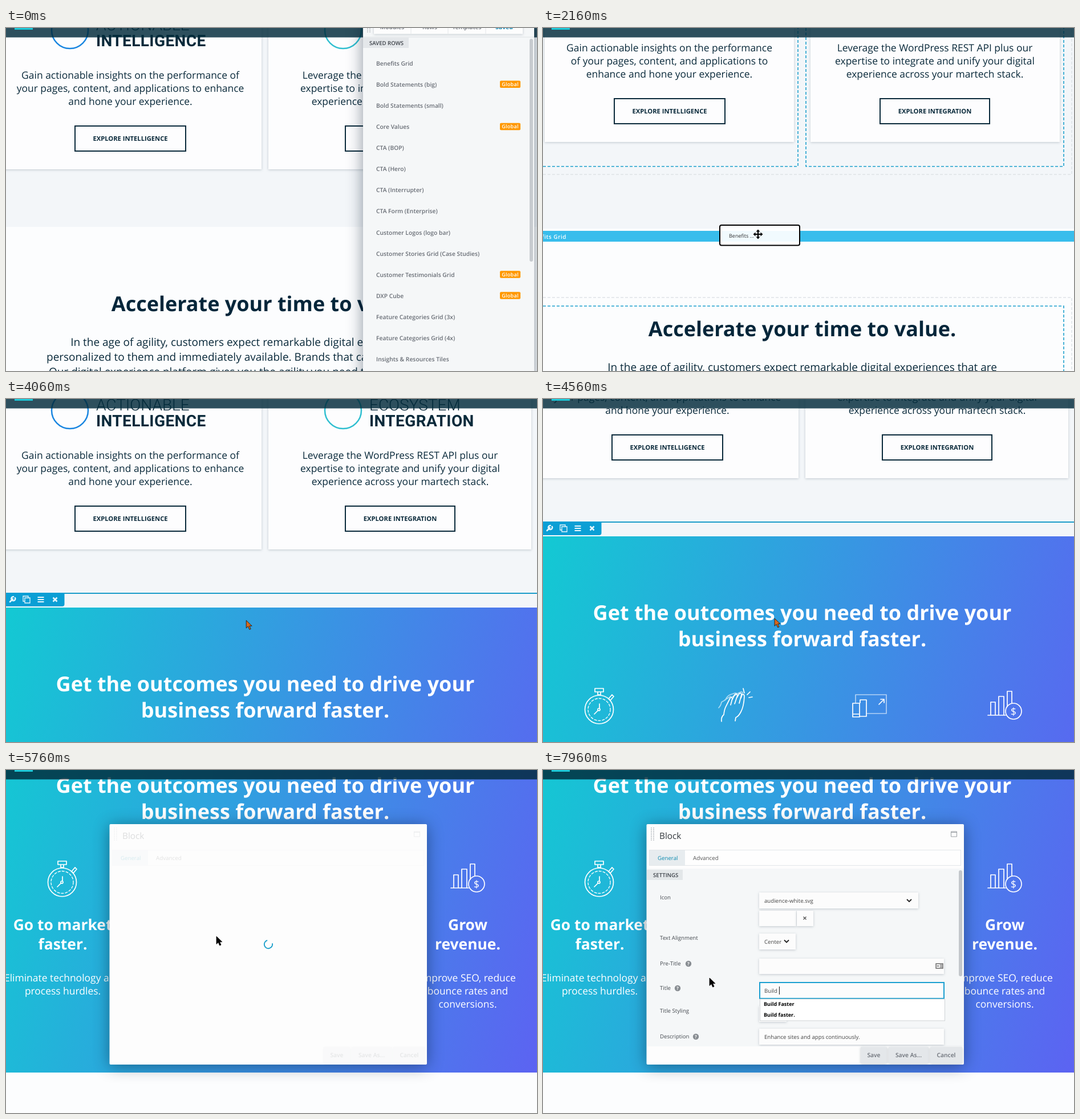
An HTML page that plays this animation: 931 px wide and 602 px high, repeating every 8000 ms.

```html
<!DOCTYPE html>
<html lang="en">
<head>
<meta charset="utf-8">
<title>Page builder</title>
<style>
html, body { margin: 0; width: 931px; height: 602px; overflow: hidden; }
svg { display: block; font-family: "Open Sans", sans-serif; text-rendering: geometricPrecision; }
.shadow { filter: drop-shadow(0 1px 2px rgba(40, 60, 80, .25)); }
.deep { filter: drop-shadow(0 3px 14px rgba(0, 20, 40, .45)); }
.line { fill: none; stroke: #fff; stroke-width: 1.7; stroke-linejoin: round; stroke-linecap: round; }
</style>
</head>
<body>
<svg id="stage" width="931" height="602" viewBox="0 0 931 602"></svg>
<script>
const NAVY = '#0a2a3b', BLUE = '#0b9fd5', GREY = '#686d75';

// Markup helpers
const rect = (x, y, w, h, fill, more = '') =>
  `<rect x="${x}" y="${y}" width="${w}" height="${h}" fill="${fill}" ${more}/>`;
const path = (d, more = '') => `<path d="${d}" ${more}/>`;
const text = (x, y, s, size, fill, weight = 400, anchor = 'start', more = '') =>
  `<text x="${x}" y="${y}" font-size="${size}" fill="${fill}" font-weight="${weight}" text-anchor="${anchor}" ${more}>${s}</text>`;
const lines = (x, y, step, list, size, fill, weight, anchor = 'middle') =>
  list.map((s, i) => text(x, y + i * step, s, size, fill, weight, anchor)).join('');
const group = (id, body, more = '') => `<g id="${id}" ${more}>${body}</g>`;
const at = (x, y, body) => `<g transform="translate(${x} ${y})">${body}</g>`;
const white = 'class="line"';

const icons = {
  wrench: path('M-4 4L1-1M5-3A3.500 3.500 0 1 1 2-5', 'fill="none" stroke="#e8f6fc" stroke-width="2.500" stroke-linecap="round"'),
  copy: path('M-3-3H6V6H-3ZM-3 3H-6V-6H3V-3', 'fill="none" stroke="#e8f6fc" stroke-width="1.300"'),
  menu: path('M-5.500-4H5.500M-5.500 0H5.500M-5.500 4H5.500', 'stroke="#e8f6fc" stroke-width="2"'),
  close: path('M-3.500-3.500L3.500 3.500M-3.500 3.500L3.500-3.500', 'stroke="#e8f6fc" stroke-width="2.600"'),
  columns: path('M-6-5H6V5H-6ZM0-5V5M-6-4H6', 'fill="none" stroke="#e8f6fc" stroke-width="1.400"'),
  move: path('M-6 0H6M0-6V6', 'stroke="currentColor" stroke-width="2.200"') +
    path('M0-8.500l3.500 4h-7zM0 8.500l3.500-4h-7zM-8.500 0l4-3.500v7zM8.500 0l-4-3.500v7z', 'fill="currentColor"')
};
const toolbar = (x, y, w, names) =>
  path(`M${x} ${y}h${w}v20q0 4-4 4h${4 - w}z`, `fill="${BLUE}"`) +
  names.map((n, i) => at(x + 11 + i * 25, y + 12, icons[n])).join('');
const rowBar = y => rect(0, y, 931, 2, '#1a9cc9') + toolbar(0, y, 102.5, ['wrench', 'copy', 'menu', 'close']);
const spinner = (id, x, y) => at(x, y, group(id,
  path('M5.100-5.100A7.200 7.200 0 1 1-5.100-5.100', 'fill="none" stroke="#1b9fcb" stroke-width="1.900"')));
const chevron = (x, y) => path(`M${x - 4} ${y - 2}l4 4 4-4`, 'fill="none" stroke="#222" stroke-width="1.800"');
const grip = (x, y, rows) => path(`M${x} ${y}v${rows * 3}M${x + 4} ${y}v${rows * 3}`,
  'stroke="#b9bec3" stroke-width="2" stroke-dasharray="1.500 1.500"');

const button = (x, y, w, s) => rect(x + 1, y + 1, w - 2, 44, '#fdfdfe', `stroke="${NAVY}" stroke-width="2"`) +
  text(x + w / 2, y + 27, s, 11.2, NAVY, 700, 'middle');
const card = (x, bottom, w) => rect(x, -60, w, bottom + 60, '#fdfdfe', 'class="shadow"');
const integrationCopy = ['Leverage the WordPress REST API plus our',
  'expertise to integrate and unify your digital', 'experience across your martech stack.'];
const lockup = (x, color, top, bottom) =>
  `<circle cx="${x}" cy="4" r="32" fill="none" stroke="${color}" stroke-width="2.500"/>` +
  text(x + 46, 4, top, 28, NAVY, 300, 'start', 'font-family="Roboto, sans-serif"') +
  text(x + 46, 32, bottom, 28, NAVY, 700, 'start', 'font-family="Roboto, sans-serif" letter-spacing=".4"');
const accelerate = y => text(454.5, y, 'Accelerate your time to value.', 36, '#04263a', 700, 'middle') +
  text(454.5, y + 61, 'In the age of agility, customers expect remarkable digital experiences that are', 19, NAVY, 400, 'middle') +
  text(71, y + 87, 'personalized to them and immediately available. Brands that can', 19, NAVY) +
  text(75, y + 113, 'Our digital experience platform gives you the agility you need to', 19, NAVY);

const cards = rect(0, -700, 931, 1049, '#f3f6f9') + card(-10, 248, 458) + card(460, 248, 461) +
  lockup(112, '#1a86e0', 'ACTIONABLE', 'INTELLIGENCE') + lockup(591, '#30bfd0', 'ECOSYSTEM', 'INTEGRATION') +
  lines(218, 89, 23, ['Gain actionable insights on the performance of',
    'your pages, content, and applications to enhance', 'and hone your experience.'], 17.45, NAVY) +
  lines(691, 89, 23, integrationCopy, 17.45, NAVY) +
  button(120, 171, 196, 'EXPLORE INTELLIGENCE') + button(594, 171, 194, 'EXPLORE INTEGRATION');

const dashed = (d, color) => path(d, `fill="none" stroke="${color}" stroke-width="1.600" stroke-dasharray="5 3"`);
const dragLayout = rect(0, 0, 931, 352, '#f3f6f9') + card(3, 200, 437) + card(469, 200, 437) +
  lines(221.5, 41, 23, ['Gain actionable insights on the performance',
    'of your pages, content, and applications to', 'enhance and hone your experience.'], 17.45, NAVY) +
  lines(687, 41, 23, integrationCopy, 17.45, NAVY) +
  button(124, 123, 196, 'EXPLORE INTELLIGENCE') + button(590, 123, 194, 'EXPLORE INTEGRATION') +
  dashed('M0 257H927V0M0 473H927V602', '#dfe4e8') +
  dashed('M0 243H447V0M461 0V243H913V0M0 488H913V602', '#1fa1cd') + accelerate(541) +
  group('dropBar', rect(0, 356, 931, 19, '#38bdec') + text(41, 370, 'Benefits Grid', 10, '#fff', 600, 'end', 'letter-spacing=".5"'));

// Gradient row, with its top edge at y = 0
const feature = (x, title, copy) => lines(x, 387.5, 34, title, 26.4, '#fff', 700) + lines(x, 478, 23, copy, 17.45, '#fff');
const stopwatch = `<circle cx="98.500" cy="304" r="25"/><circle cx="98.500" cy="304" r="19.500" stroke-dasharray="4 3" stroke-width="1.300"/>
  <circle cx="98" cy="304" r="2"/>` + path('M91 267h15v6h-15zM96 273v5h5v-5M115 285l6-7 3 3-6 7zM99 294v8M96 306l-6 6');
const clap = path('M313 325q-1-8 4-12q1-10 4-15l7-14q3-3 4 1l-3 11m2-8l5-10q4-3 5 1l-5 15m4-11l4-7q4-2 4 2l-4 15m3-9l2-6q4-2 4 3q-1 18-6 27q-4 8-9 10l-1 6M351 267l2 8M358 278l5-5M361 283l6-1') +
  path('M308 301q4-4 5-10l7-4q2-6 8-9l9-3q4 0 2 3l-8 4M319 287l10-6M339 277l8-4q5 0 2 4', 'opacity=".6"');
const devices = path('M548 292V278H602V311H568', 'opacity=".6"') + path('M556 292V287H567V316H556M555 293H543V317H555ZM543 312H555M589 295l9-9m-6 0h6v6');
const chart = path('M780 314H811M785 314V291H793V314M799 314V281H808V314M814 299V272H822V293') + '<circle cx="825" cy="307" r="14"/>';
const outcomes = rect(0, 0, 931, 638, 'url(#sky)') +
  lines(454.5, 147, 46, ['Get the outcomes you need to drive your', 'business forward faster.'], 36, '#fff', 700) +
  `<g ${white}>${stopwatch}${clap}${devices}${chart}</g>` + text(825, 313.5, '$', 18, '#fff', 400, 'middle') +
  feature(99.5, ['Go to market', 'faster.'], ['Eliminate technology and', 'process hurdles.']) +
  feature(336, ['Cultivate', 'audiences.'], ['Enhance sites and apps', 'continuously.']) +
  feature(572.5, ['Scale', 'flawlessly.'], ['Grow from 0 to millions', 'of concurrent hits.']) +
  feature(809.5, ['Grow', 'revenue.'], ['Improve SEO, reduce', 'bounce rates and', 'conversions.']) +
  group('rowOverlay', rowBar(-26) + rect(0, 636, 931, 2.5, '#2a72b8')) +
  group('columnOverlay', rect(221.5, 254, 229, 264, 'none', `stroke="${BLUE}" stroke-width="1.500"`) +
    toolbar(221, 253, 133, ['wrench', 'wrench', 'copy', 'columns', 'close']
      .map((n, i) => i ? n : 'move')) .replace('<path', '<path') +
    [221.5, 450.5].map(x => `<circle cx="${x}" cy="387" r="4" fill="#fff" stroke="${BLUE}"/>`).join(''), 'color="#e8f6fc"');

// Saved rows panel
const saved = ['Benefits Grid', 'Bold Statements (big)', 'Bold Statements (small)', 'Core Values', 'CTA (BOP)', 'CTA (Hero)',
  'CTA (Interrupter)', 'CTA Form (Enterprise)', 'Customer Logos (logo bar)', 'Customer Stories Grid (Case Studies)',
  'Customer Testimonials Grid', 'DXP Cube', 'Feature Categories Grid (3x)', 'Feature Categories Grid (4x)', 'Insights &amp; Resources Tiles'];
const isGlobal = [1, 3, 10, 11];
const panel = rect(626, -20, 300, 640, '#f5f7f8', 'class="deep"') +
  rect(645, -20, 261, 30.5, '#fdfdfd', 'class="shadow"') + path('M710 0V10M775 0V10M841 0V10', 'stroke="#e3e6e9"') +
  grip(634, 0, 3) + rect(626, 15.5, 300, 1, '#dfe3e6') +
  lines(677, 2, 0, ['Modules'], 10.3, GREY, 600) + lines(743, 2, 0, ['Rows'], 10.3, GREY, 600) +
  lines(808, 2, 0, ['Templates'], 10.3, GREY, 600) + lines(873.5, 2, 0, ['Saved'], 10.3, '#0e86b4', 700) +
  rect(626, 17, 80, 18, '#e4e7ea') + text(637, 30, 'SAVED ROWS', 9.6, '#3c4148', 600) +
  rect(918, 19, 6, 391, '#c7cbcf', 'rx="3"') +
  group('rowHover', rect(645, 43.5, 261, 37, '#fff', 'class="shadow"') +
    path('M862 66l5-5m4-2a3 3 0 1 1-3-3M886 59l6 6m0-6l-6 6', 'fill="none" stroke="#777" stroke-width="2"')) +
  saved.map((s, i) => {
    const y = 62 + i * 37.07;
    return text(649, y + 4, s, 10.3, GREY, 600) + (isGlobal.includes(i)
      ? rect(866, y - 6.5, 36, 12.5, '#ff9800', 'rx="2"') + text(884, y + 3, 'Global', 9, '#fff', 600, 'middle', 'letter-spacing=".3"') : '');
  }).join('');

// Settings lightbox
const label = (y, s, help) => text(205, y + 3.5, s, 9.65, '#454a50') + (help
  ? `<circle cx="${help}" cy="${y + 1}" r="5.200" fill="#888d92"/>` + text(help, y + 4, '?', 8, '#fff', 700, 'middle') : '');
const field = (x, y, w, s = '', h = 28, fill = '#fcfcfc') => rect(x, y, w, h, fill, 'class="shadow"') + text(388, y + 18, s, 9.65, '#444');
const action = (x, w, s) => rect(x, 486, w, 29, '#e4e7ea', 'rx="1" class="shadow"') + text(x + w / 2, 503.5, s, 10.3, GREY, 600, 'middle');
const chrome = text(204, 120.5, 'Block', 15.3, '#33383d') + grip(190, 101, 8) +
  path('M715.500 108H725.500V117H715.500ZM715.500 109.500H725.500', 'fill="none" stroke="#9a9fa4"') +
  rect(186.5, 140.5, 546, 27, '#fefefe', 'stroke="#e2e6e9"') + rect(187, 141, 62, 26, '#e7ecef') +
  text(201, 157.5, 'General', 9.7, '#0d8bb0') + text(263, 157.5, 'Advanced', 9.8, '#555') +
  action(557, 46, 'Save') + action(606, 70, 'Save As...') + action(679, 56, 'Cancel');
const form = rect(182, 173, 556, 312, '#f5f7f8') + rect(182, 175, 63, 18, '#e3e7e9') +
  text(193, 187.5, 'SETTINGS', 9.6, '#3c4148', 600) + rect(729, 176, 6, 186, '#c3c7cb', 'rx="3"') +
  label(223, 'Icon') + field(379, 215, 279, 'audience-white.svg') + chevron(642, 229) +
  field(379, 247, 65, '', 27) + field(445, 247, 29, '', 27) + path('M456.500 257.500l5 5m0-5l-5 5', 'stroke="#555" stroke-width="1.400"') +
  label(294, 'Text Alignment') + field(379, 287, 64, 'Center') + chevron(427, 300.5) +
  label(339, 'Pre-Title', 255) + field(379, 331, 324, '', 27) +
  path('M689 340h12v8h-12zM690.500 344h4M696 342.500h4M696 345.500h4', 'fill="none" stroke="#666" stroke-width="1.400"') +
  label(382, 'Title', 236) + rect(380, 373, 323, 28, '#fcfcfc', 'id="titleBox" stroke-width="2"') +
  rect(388, 380, 0, 14, '#3390f0', 'id="selection"') + text(388, 391, '', 9.65, '#444', 400, 'start', 'id="titleText" xml:space="preserve"') +
  rect(0, 380, 1, 14, '#111', 'id="caret"') +
  label(422, 'Title Styling') + field(379, 414, 48, 'H3') + chevron(413, 428) +
  label(467, 'Description', 268) + field(379, 454, 324, 'Enhance sites and apps continuously.') + rect(182, 485, 556, 3, '#fdfdfd') +
  group('suggestions', rect(380.5, 402, 324, 38, '#fff', 'stroke="#cfd3d6"') + lines(387, 414, 19, ['Build Faster', 'Build faster.'], 9, '#000', 700, 'start'));
const lightbox = rect(181.5, 95, 556.5, 422, '#fdfdfd', 'rx="2" class="deep"') + group('form', form) +
  group('chrome', chrome) + spinner('boxSpinner', 460, 306);

const cursors = group('moveCursor', icons.move, 'color="#000"') +
  group('arrow', path('M0 0V13.500L3.200 10.500 5.600 16 8 15 5.700 9.700H10Z', 'stroke="#111" stroke-width=".8"')) +
  group('hand', path('M0-1q2-1 2.500 1v6l6 2q2 1 1.500 4l-1 4q-1 3-3 3h-5q-2 0-4-4l-3-4q0-2 2-1l3 2v-11q0-2 1-2z', 'fill="#d9681d" stroke="#222" stroke-width="1.200"')) +
  group('beam', path('M-2.500-7h5M0-7V7M-2.500 7h5', 'stroke="#222" stroke-width="1.200"'));

document.getElementById('stage').innerHTML =
  `<defs><linearGradient id="sky" gradientUnits="userSpaceOnUse" x1="-48" y1="181" x2="979" y2="457">
    <stop stop-color="#13c9d3"/><stop offset="1" stop-color="#5c63f2"/></linearGradient></defs>` +
  rect(0, 0, 931, 602, '#fcfdfe') +
  group('lower', rect(0, 349, 931, 700, '#fcfdfe') + accelerate(497)) + group('cards', cards) +
  group('dragLayout', dragLayout) +
  group('loadingRow', rowBar(379) + spinner('rowSpinner', 454.5, 385)) + group('outcomes', outcomes) +
  rect(0, 0, 931, 16.5, '#002a3a', 'opacity=".82"') + rect(15, 0, 32, 3, '#1cc8d8') +
  group('panel', panel) +
  group('helper', rect(-67, -16, 140, 35.5, '#fff', 'rx="3" stroke="#000" stroke-width="2" fill-opacity=".93"') + text(-51, 6, 'Benefits ...', 9, '#333')) +
  group('lightbox', lightbox) + group('cursor', cursors);

// Keyframes: [ms, ...values]
const pointerKeys = [[200, 720, 76], [400, 690, 62], [660, 690, 62], [860, 668, 87], [1160, 584, 167], [1860, 377, 362], [2360, 377, 362],
  [2660, 440, 401], [2960, 512, 417], [3260, 482, 403], [3660, 482, 403], [4160, 406, 385], [5360, 406, 385],
  [5760, 369, 292], [6360, 470, 218], [6760, 487, 384], [7060, 292, 365]];
const scrollKeys = [[4460, 0], [4560, 125], [4660, 310], [4760, 463], [5060, 463], [5260, 473]];
const panelKeys = [[660, 0], [760, 40], [1060, 320]];
const typedKeys = [[0, 'Cultivate audiences.'], [7360, 'B'], [7660, 'Bui'], [7760, 'Buil'], [7960, 'Build ']];

function along(keys, t) {
  const next = keys.findIndex(k => k[0] > t);
  if (next === 0) return keys[0].slice(1);
  if (next < 0) return keys[keys.length - 1].slice(1);
  const [a, b] = [keys[next - 1], keys[next]], f = (t - a[0]) / (b[0] - a[0]);
  return a.slice(1).map((v, i) => v + (b[i + 1] - v) * f);
}
const el = id => document.getElementById(id);
const show = (id, on) => { el(id).style.display = on ? '' : 'none'; };
const shift = (id, x, y) => el(id).setAttribute('transform', `translate(${x} ${y})`);
const LOAD = 3860, DROP = 2360;

function draw(ms) {
  const t = ms < 660 ? Math.floor(ms / 100) * 100 : Math.floor((ms - 60) / 100) * 100 + 60;
  const during = (from, to) => t >= from && t < to;
  const [x, y] = along(pointerKeys, t), [scroll] = along(scrollKeys, t);
  const dragging = during(660, DROP), loaded = t >= LOAD;

  show('cards', !dragging);
  show('lower', !dragging);
  shift('cards', 0, t < DROP ? 0 : 16 - scroll);
  shift('lower', 0, t < DROP ? 0 : loaded ? 655 - scroll : 56);
  show('dragLayout', dragging);
  show('dropBar', t >= 1860);
  show('helper', dragging);
  shift('helper', x, y);
  show('panel', t < 1060);
  shift('panel', along(panelKeys, t)[0], 0);
  show('rowHover', t >= 200);

  show('loadingRow', during(DROP, LOAD));
  show('outcomes', loaded);
  shift('outcomes', 0, 366 - scroll);
  show('rowOverlay', t < 5560);
  show('columnOverlay', during(4960, 5560));
  for (const id of ['rowSpinner', 'boxSpinner']) el(id).setAttribute('transform', `rotate(${(t - 3360) * .3125})`);

  const ready = t >= 6060;
  show('lightbox', t >= 5560);
  show('form', ready);
  show('boxSpinner', !ready);
  el('chrome').setAttribute('opacity', ready ? 1 : .16);
  const typed = typedKeys.filter(k => k[0] <= t).pop()[1], title = el('titleText');
  title.textContent = typed;
  title.setAttribute('fill', during(6960, 7360) ? '#fff' : '#444');
  el('titleBox').setAttribute('stroke', t >= 6760 ? '#1b9fd0' : 'none');
  show('selection', during(6760, 7360));
  const left = Math.max(388, x);
  el('selection').setAttribute('x', left);
  el('selection').setAttribute('width', Math.max(0, 477 - left));
  show('caret', t >= 7360);
  el('caret').setAttribute('x', t >= 7360 ? 388.5 + title.getComputedTextLength() : 0);
  show('suggestions', t >= 7460);

  show('cursor', t >= 200);
  shift('cursor', x, y);
  const beam = during(6660, 6960), hand = during(4960, 5560);
  show('moveCursor', t < DROP);
  show('beam', beam);
  show('hand', hand);
  show('arrow', t >= DROP && !beam && !hand);
  el('arrow').setAttribute('fill', during(LOAD, 4960) ? '#d9681d' : '#000');
}

function tick() {
  draw(performance.now() % 8000);
  requestAnimationFrame(tick);
}
tick();
</script>
</body>
</html>
```
